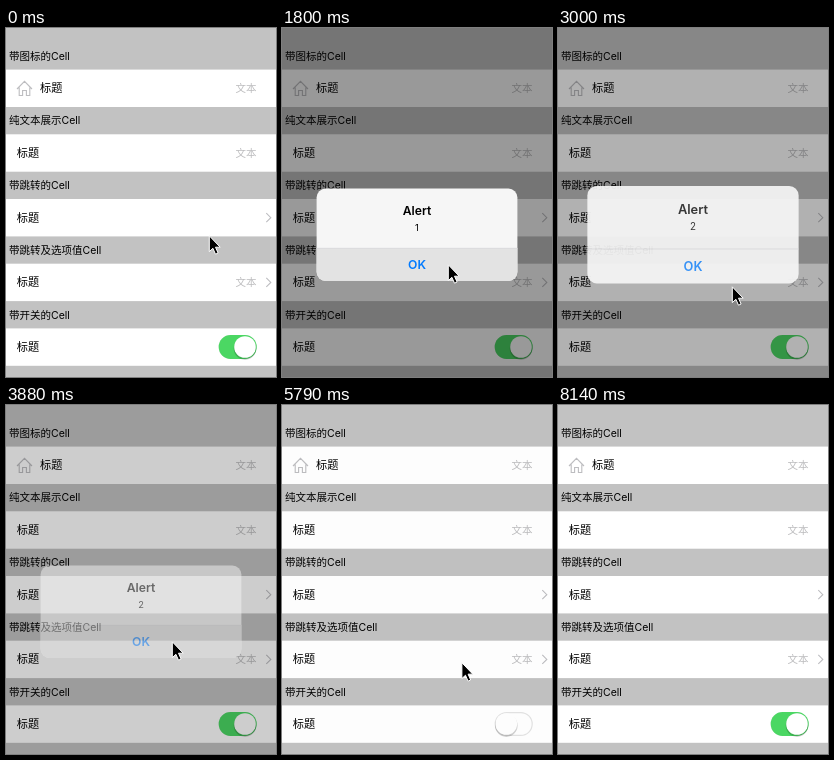
An HTML page that plays this animation: 270 px wide and 349 px high, repeating every 8430 ms.

```html
<!DOCTYPE html>
<html lang="zh-CN">
<head>
<meta charset="utf-8">
<style>
html, body { margin: 0; width: 100%; height: 100%; overflow: hidden; background: #c2c2c2; }
svg { display: block; width: 100%; height: 100%; font-family: Inter, "Noto Sans CJK SC", "Noto Sans CJK", sans-serif; }
.head { font-size: 10.5px; }
.title { font-size: 11.2px; }
.value { font-size: 10.5px; fill: #bdbdbf; text-anchor: end; }
.line { fill: none; stroke: #bdbdc0; stroke-width: 1.1; }
#alert { text-anchor: middle; font-size: 12.2px; font-weight: 600; }
#msg { font-size: 9.3px; font-weight: 400; }
</style>
</head>
<body>
<svg viewBox="0 0 270 349">
  <rect width="270" height="349" fill="#c2c2c2"/>
  <g id="rows"></g>
  <path class="line" d="M11 61L18.5 53.3L26 61M13.2 59.5V67.5H16.6V62.5H20.4V67.5H23.8V59.5"/>
  <rect x="213.2" y="307.6" width="37" height="22.8" rx="11.4" fill="#fff" stroke="#e3e3e3" stroke-width="1.2"/>
  <rect id="track" x="212.7" y="307.1" width="38" height="23.8" rx="11.9" fill="#4bd763"/>
  <g id="knob">
    <circle cy="320.6" r="11.3" opacity=".18"/>
    <circle cy="319" r="10.8" fill="#fff"/>
  </g>
  <rect id="dim" width="270" height="349"/>
  <g id="alert">
    <rect x="34.6" y="160.5" width="200.8" height="92.5" rx="9" fill="#f6f6f6"/>
    <path id="press" d="M34.6 220H235.4V244a9 9 0 0 1-9 9H43.6a9 9 0 0 1-9-9Z" fill="#e3e3e3"/>
    <path d="M34.6 220.3H235.4" stroke="#d9d9db" stroke-width=".7"/>
    <g id="words">
      <text x="135" y="187.4">Alert</text>
      <text id="msg" x="135" y="202.6"></text>
      <text x="135" y="241.4" fill="#007aff">OK</text>
    </g>
  </g>
  <path id="cursor" d="M.3-.2V15.6L3.9 12.3L6.5 18.2L9.1 17L6.5 11.2H11.2Z" stroke="#fff"/>
</svg>
<script>
const $ = id => document.getElementById(id);
const set = (id, name, value) => $(id).setAttribute(name, value);
const LOOP = 8430, TICK = 148;   // the picture updates once per tick

const cells = [
  { head: '带图标的Cell', icon: true, value: '文本' },
  { head: '纯文本展示Cell', value: '文本' },
  { head: '带跳转的Cell', arrow: true },
  { head: '带跳转及选项值Cell', value: '文本', arrow: true },
  { head: '带开关的Cell' }
];
$('rows').innerHTML = cells.map(({ head, icon, value = '', arrow }, i) =>
  `<g transform="translate(0 ${i * 64.7})">
    <text class="head" x="3" y="31.8">${head}</text>
    <rect y="41.6" width="270" height="37.4" fill="#fff"/>
    <text class="title" x="${icon ? 34 : 10.7}" y="64.4">标题</text>
    <text class="value" x="250.5" y="64.2">${value}</text>
    ${arrow ? '<path class="line" d="M260.3 55.8L264.8 60.3L260.3 64.8"/>' : ''}
  </g>`).join('');

// Each tap opens an alert, which is closed with OK; times are in ticks.
const taps = [
  { at: [194, 185], open: 4.2, close: 12.6, text: '1' },
  { at: [174, 259], open: 19.2, close: 25.6, text: '2' },
  { at: [224, 311], open: 31, close: 36.8, text: 'false' },
  { at: [214, 311], open: 44, close: 51.9, text: 'true' }
];
const [, , switchOff, switchOn] = taps;
const OK = [166, 237], ENTER = [203, 208], EXIT = [280, 200];

// The cursor rests around each tap and each press of OK, and glides between.
const stops = [
  { from: 0, to: 0, at: ENTER },
  ...taps.flatMap(({ at, open, close }) => [
    { from: open - 1.2, to: open + 1, at },
    { from: close - 1.5, to: close + .7, at: OK }
  ]),
  { from: 55, to: 58, at: EXIT }
];

const clamp = v => Math.min(1, Math.max(0, v));
const decay = age => Math.exp(-1.8 * Math.max(0, age));

function cursorAt(k) {
  const i = stops.findLastIndex(s => k >= s.from);
  const here = stops[i], next = stops[i + 1] || here;
  const f = clamp((k - here.to) / (next.from - here.to));
  return here.at.map((v, axis) => v + (next.at[axis] - v) * f);
}

function draw(k) {
  const { open, close, text } = taps.findLast(tap => k >= tap.open) || taps[0];
  const hidden = decay(k - open), fade = decay(k - close);
  set('dim', 'opacity', .4 * (1 - hidden) * fade);
  set('alert', 'opacity', fade < .03 ? 0 : (1 - hidden ** 1.8) * fade);
  set('alert', 'transform', `translate(135 207) scale(${1 + .22 * hidden}) translate(-135 -207)`);
  set('words', 'opacity', 1 - .8 * hidden);
  set('press', 'opacity', k > close - 1 ? 1 : 0);
  $('msg').textContent = text;

  const on = k < switchOn.open ? decay(k - switchOff.open) : 1 - decay(k + .2 - switchOn.open);
  set('track', 'opacity', on);
  set('knob', 'transform', `translate(${224.3 + 14.7 * on} 0)`);
  set('cursor', 'transform', `translate(${cursorAt(k)})`);
}

const origin = performance.now();
function frame() {
  draw(Math.floor((performance.now() - origin) % LOOP / TICK));
  requestAnimationFrame(frame);
}
frame();
</script>
</body>
</html>
```
